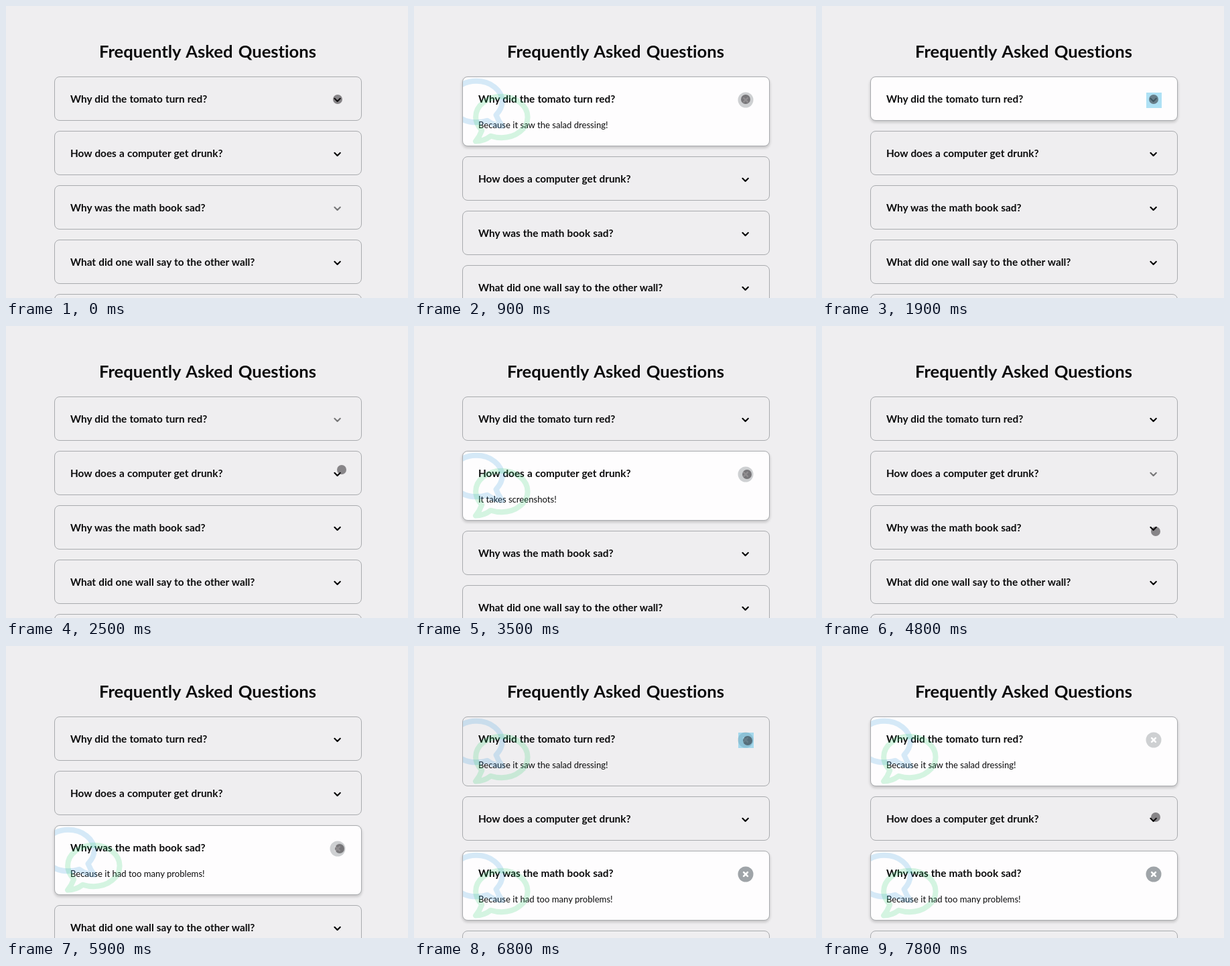
Recreate the animation shown at these times as an HTML page. Size 600 by 435 pixels, loop 8 s.

```html
<!DOCTYPE html>
<html lang="en">
<head>
<meta charset="utf-8">
<title>FAQ</title>
<style>
@property --lit { syntax: "<number>"; inherits: false; initial-value: 0; }

html, body { margin: 0; width: 600px; height: 435px; overflow: hidden; }
body {
  position: relative;
  background: #efeef0;
  color: #0b0b0c;
  font-family: Lato, "Open Sans", sans-serif;
  font-variant-ligatures: none;
}
h1, h2, p { margin: 0; white-space: nowrap; }
h1 {
  position: absolute; left: 72px; top: 52px; width: 458px;
  font-size: 25.6px; line-height: 30px; text-align: center; word-spacing: 2px;
}
#list { position: absolute; left: 72px; top: 105px; width: 459px; }

.card {
  --open: 0; --dim: 1;
  position: relative;
  box-sizing: border-box;
  height: calc(66px + 38px * var(--open));
  margin-bottom: 15px;
  overflow: hidden;
  border: 1px solid #a9abae;
  border-radius: 8px;
  background: rgb(254 253 254 / var(--lit));
  --shade: rgb(0 0 0 / calc(.1 * var(--lit)));
  box-shadow: 0 2.3px 4.6px var(--shade), 0 2.3px 4.6px var(--shade);
}
.card > * { position: absolute; }
h2 { left: 23px; top: 23px; font-size: 15.35px; line-height: 18px; word-spacing: .4px; }
p { left: 23px; top: 63px; font-size: 13.1px; line-height: 16px; }
p, .bubbles, .close { opacity: var(--open); }
.bubbles { left: 0; top: 0; width: 110px; height: 102px; }
.bubbles path { fill: none; stroke-width: 48; stroke-linejoin: round; opacity: .2; }
.toggle { left: 410.2px; top: 22.2px; width: 24px; height: 24px; opacity: var(--dim); }
.toggle path { fill: none; stroke-linecap: round; stroke-linejoin: round; }
.chevron { stroke: #000; stroke-width: 2.1; opacity: calc(1 - var(--open)); }
.close circle { fill: #9fa4a8; }
.close path { stroke: #fff; stroke-width: 2.6; }

#tap {
  position: absolute; left: 484px; top: 129px; width: 23px; height: 23px;
  background: rgb(51 181 229 / .4);
  animation: tapRow 8s step-end infinite, tapFade 8s linear infinite;
}
#touch {
  position: absolute; left: -7px; top: -7px; width: 14px; height: 14px;
  border-radius: 50%;
  background: rgb(32 28 32 / .5);
  animation: touch 8s linear infinite;
}

.card:nth-child(1) { animation: state1 8s step-end infinite, lit1 8s ease infinite; }
.card:nth-child(2) { animation: state2 8s step-end infinite, lit2 8s ease infinite; }
.card:nth-child(3) { animation: state3 8s step-end infinite, lit3 8s ease infinite; }

@keyframes state1 {
  0% { --open: 0; --dim: 1; }
  7.5% { --open: 1; --dim: .5; }
  23.75% { --open: 0; --dim: .5; }
  38.75% { --open: 0; --dim: 1; }
  85%, 100% { --open: 1; --dim: .5; }
}
@keyframes state2 {
  0% { --open: 0; --dim: 1; }
  38.75% { --open: 1; --dim: .5; }
  52.5% { --open: 0; --dim: .5; }
  66.25%, 100% { --open: 0; --dim: 1; }
}
@keyframes state3 {
  0% { --open: 0; --dim: .5; }
  7.5% { --open: 0; --dim: 1; }
  66.25% { --open: 1; --dim: .5; }
  85%, 100% { --open: 1; --dim: 1; }
}
@keyframes lit1 {
  0%, 7.5%, 27.5%, 85% { --lit: 0; }
  11.25%, 23.75%, 88.75%, 100% { --lit: 1; }
}
@keyframes lit2 {
  0%, 38.75%, 56.25%, 100% { --lit: 0; }
  42.5%, 52.5% { --lit: 1; }
}
@keyframes lit3 {
  0%, 66.25% { --lit: 0; }
  70%, 100% { --lit: 1; }
}
@keyframes tapRow {
  0% { top: 129px; }
  38.7% { top: 210px; }
  66.2% { top: 291px; }
  84.9%, 100% { top: 129px; }
}
@keyframes tapFade {
  0%, 7.49%, 10%, 23.74%, 26.25%, 38.74%, 41.25%, 52.49%, 55%,
  66.24%, 68.75%, 84.99%, 87.5%, 100% { opacity: 0; }
  7.5%, 23.75%, 38.75%, 52.5%, 66.25%, 85% { opacity: 1; }
}
@keyframes touch {
  0%, 27.5% { transform: translate(495px, 139px); }
  28.75% { transform: translate(497px, 152px); }
  30% { transform: translate(500px, 188px); }
  31.25% { transform: translate(501px, 214px); }
  32.5% { transform: translate(500px, 219px); }
  33.75%, 35.5% { transform: translate(499px, 220px); }
  36.25%, 49.5% { transform: translate(497px, 221px); }
  50%, 55% { transform: translate(498px, 220px); }
  56.25% { transform: translate(500px, 238px); }
  57.5% { transform: translate(500px, 272px); }
  58.75% { transform: translate(499px, 299px); }
  60%, 72.5% { transform: translate(498px, 306px); }
  73.75% { transform: translate(498px, 302px); }
  75% { transform: translate(496px, 284px); }
  77.5% { transform: translate(494px, 218px); }
  80% { transform: translate(498px, 150px); }
  81.25%, 91.25% { transform: translate(498px, 141px); }
  92.5% { transform: translate(499px, 160px); }
  93.75% { transform: translate(500px, 212px); }
  95% { transform: translate(498px, 249px); }
  97.5%, 100% { transform: translate(498px, 255px); }
}
</style>
</head>
<body>
<h1>Frequently Asked Questions</h1>
<div id="list"></div>
<div id="tap"></div>
<div id="touch"></div>
<script>
const faqs = [
  ["Why did the tomato turn red?", "Because it saw the salad dressing!"],
  ["How does a computer get drunk?", "It takes screenshots!"],
  ["Why was the math book sad?", "Because it had too many problems!"],
  ["What did one wall say to the other wall?", ""],
  ["", ""]
];

const bubble = "M256 56C128 56 24 138 24 240c0 46 21 82 55 119C64 399 45 430 24 456" +
  "c50 0 95-18 134-47C190 419 222 424 256 424c128 0 232-82 232-184S384 56 256 56z";

const card = ([question, answer]) => `
  <div class="card">
    <h2>${question}</h2>
    <p>${answer}</p>
    <svg class="bubbles">
      <path d="${bubble}" stroke="#3498db" transform="translate(62.7 -3.5) scale(-.167 .167)"/>
      <path d="${bubble}" stroke="#2ecc71" transform="translate(15.1 19.4) scale(.167)"/>
    </svg>
    <svg class="toggle" viewBox="-12 -12 24 24">
      <path class="chevron" d="M-4.6-2.2 -.4 2 3.8-2.2"/>
      <g class="close"><circle r="11.5"/><path d="M-2.9-2.9 2.9 2.9M2.9-2.9-2.9 2.9"/></g>
    </svg>
  </div>`;

document.getElementById("list").innerHTML = faqs.map(card).join("");
</script>
</body>
</html>
```
